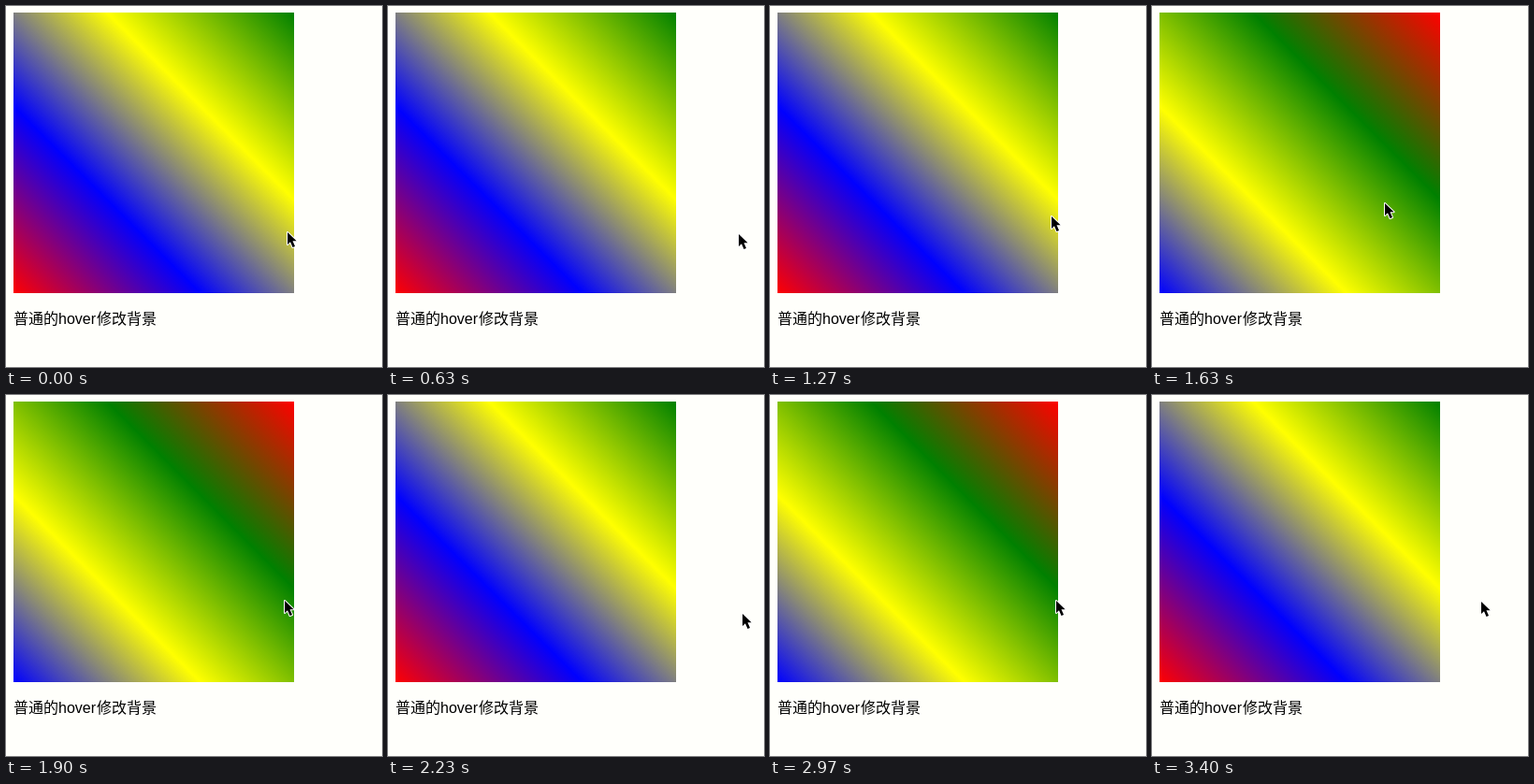
An HTML page with a canvas for the animation above (3430 ms loop, 402 by 386 pixels).

```html
<!DOCTYPE html>
<html lang="zh-CN">
<head>
<meta charset="utf-8">
<title>普通的hover修改背景</title>
<style>
  html, body { margin: 0; width: 100%; height: 100%; overflow: hidden; background: #fffffb; }
  canvas { display: block; }
</style>
</head>
<body>
<canvas id="stage" width="402" height="386"></canvas>
<script>
const ctx = document.getElementById('stage').getContext('2d');
const LOOP = 3430;
const HOVER_DELAY = 30;
const BOX = { x: 8, y: 7, size: 300 };

// Pointer path: time in ms, x, y
const path = [
  [0, 301, 242], [120, 246, 232], [420, 246, 232], [600, 375, 244],
  [1120, 375, 244], [1388, 249, 211], [1800, 249, 211], [2040, 379, 234],
  [2390, 379, 234], [2570, 240, 218], [2830, 240, 218], [3080, 352, 221],
  [LOOP, 352, 221]
];

const arrow = new Path2D('M0 0V13L3 10.2L5.5 16L8 15L5.5 9.3H9.6Z');

function gradient(colors) {
  const { x, y, size } = BOX;
  const g = ctx.createLinearGradient(x, y + size, x + size, y);
  colors.forEach((color, i) => g.addColorStop(i / (colors.length - 1), color));
  return g;
}

const normal = gradient(['red', 'blue', 'yellow', 'green']);
const hovered = gradient(['blue', 'yellow', 'green', 'red']);

function pointerAt(time) {
  const t = (time + LOOP) % LOOP;
  const i = path.findIndex(key => key[0] > t);
  const [t0, x0, y0] = path[i - 1];
  const [t1, x1, y1] = path[i];
  const p = (t - t0) / (t1 - t0);
  const ease = p * p * (3 - 2 * p);
  return { x: x0 + (x1 - x0) * ease, y: y0 + (y1 - y0) * ease };
}

// Steps at 30 per second, rounded to 10 ms
function stepTime(t) {
  const start = k => Math.round(k * 10 / 3) * 10;
  const k = Math.round(t * 0.03);
  return start(k) > t ? start(k - 1) : start(k);
}

function drawLabel() {
  ctx.fillStyle = '#000';
  ctx.font = '16px "Noto Sans CJK SC", "Noto Sans CJK", sans-serif';
  ctx.fillText('普通的', 8, 340);
  ctx.fillText('修改背景', 97, 340);
  ctx.font = '16px "Liberation Sans", Arial, sans-serif';
  ctx.fillText('hover', 56, 340);
}

function drawPointer({ x, y }) {
  ctx.save();
  ctx.translate(Math.round(x), Math.round(y));
  ctx.lineWidth = 2;
  ctx.lineJoin = 'round';
  ctx.strokeStyle = '#fff';
  ctx.stroke(arrow);
  ctx.fillStyle = '#000';
  ctx.fill(arrow);
  ctx.restore();
}

function draw(t) {
  const isHovered = pointerAt(t - HOVER_DELAY).x < BOX.x + BOX.size;
  ctx.fillStyle = '#fffffb';
  ctx.fillRect(0, 0, 402, 386);
  ctx.fillStyle = isHovered ? hovered : normal;
  ctx.fillRect(BOX.x, BOX.y, BOX.size, BOX.size);
  drawLabel();
  drawPointer(pointerAt(t));
}

const begin = performance.now();
function frame() {
  draw(stepTime((performance.now() - begin) % LOOP));
  requestAnimationFrame(frame);
}
frame();
</script>
</body>
</html>
```
